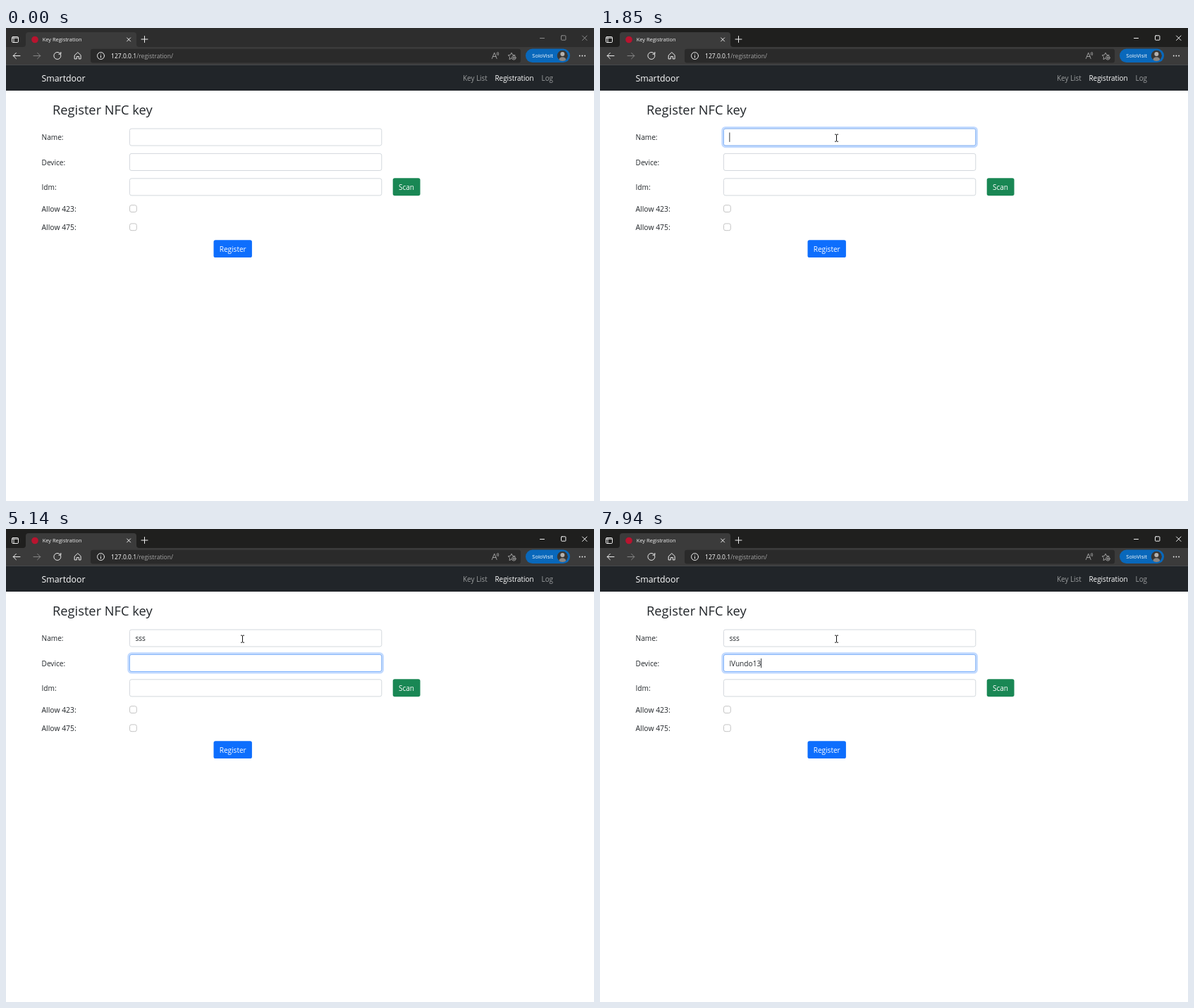
An HTML page that plays this animation: 834x672 px, repeating every 8 s.

```html
<!DOCTYPE html>
<html lang="en">
<head>
<meta charset="utf-8">
<title>Key Registration</title>
<style>
  html, body { margin: 0; width: 100%; height: 100%; overflow: hidden; background: #fff; }
  svg { display: block; width: 834px; height: 672px; font: 10.15px "Open Sans", "Noto Sans", sans-serif; }
  text { white-space: pre; fill: #212529; }
  .icon { fill: none; stroke: #eee; stroke-linecap: round; stroke-linejoin: round; }
  .dim { stroke: #858585; }
  .nav { font-size: 9.9px; fill: #9b9d9e; }
  .white { fill: #fff; }
  .field { fill: #fff; stroke: #ced4da; stroke-width: .9; }
  .check { fill: #fff; stroke: #bfbfbf; stroke-width: .9; }
  .edge { fill: none; stroke: #86b7fe; }
  .ring { fill: none; stroke: #0d6efd; stroke-opacity: .25; stroke-width: 2.67; }
</style>
</head>
<body>
<svg viewBox="0 0 834 672">
  <!-- tab strip -->
  <rect id="strip" width="834" height="28"/>
  <path d="M24 27q4 0 4-4V10q0-4 4-4H181q4 0 4 4V23q0 4 4 4z" fill="#3b3b3b"/>
  <rect y="27" width="834" height="25.5" fill="#3b3b3b"/>
  <g class="icon">
    <rect x="8.5" y="12.5" width="9" height="8" rx="1.3"/>
    <path d="M8.5 14.2H17.5M11 14V20"/>
    <path d="M171.6 13.9l5 5m0-5l-5 5M192 16h9m-4.5-4.5v9"/>
  </g>
  <g id="winButtons" class="icon">
    <path d="M757.5 14.5h6M817.5 11l6.5 6.5m0-6.5l-6.5 6.5"/>
    <rect x="787.5" y="10.8" width="6.4" height="6.4" rx=".8"/>
  </g>
  <circle cx="41" cy="16.5" r="4.8" fill="#b8142f"/>
  <text x="51.7" y="19" font-size="7.45" style="fill:#f2f2f2">Key Registration</text>

  <!-- toolbar -->
  <g class="icon">
    <path d="M20 39.5H10.2m4.2-4.2l-4.2 4.2l4.2 4.2"/>
    <path class="dim" d="M39 39.5h9.8m-4.2-4.2l4.2 4.2l-4.2 4.2"/>
    <path d="M77.8 38.5a5 5 0 1 1-1.6-2.8l1.4 1.3m.2-2.6v2.8h-2.9"/>
    <path d="M97.5 38.6l4.3-4l4.3 4v5.3h-2.8v-3.4h-3v3.4h-2.8z"/>
  </g>
  <rect x="120" y="29.8" width="610" height="19.6" rx="3" fill="#2a2a2a"/>
  <g class="icon">
    <circle cx="134.5" cy="39.5" r="5"/>
    <path d="M134.5 39.2v2.8M134.5 36.9v.1"/>
  </g>
  <text x="149" y="42.8" font-size="8.55" style="fill:#a4a4a4"><tspan class="white">127.0.0.1</tspan>/registration/</text>
  <g class="icon" style="stroke:#a9a9a9;stroke-width:.9">
    <path d="M689.3 43.5l3.4-8.5l3.4 8.5m-1.1-3h-4.6M696.3 35.2q1.1 1.1 0 2.9m1.5-3.9q1.8 2 .3 4.6"/>
    <path d="M717 43l-3 1.6l.6-3.5l-2.5-2.4l3.4-.5l1.5-3.1l1.6 3.1l3.4.5"/>
    <circle cx="720.3" cy="42.3" r="2.8"/>
    <path d="M718.9 42.3h2.8m-1.4-1.4v2.8"/>
  </g>
  <rect x="737" y="29.6" width="63" height="19.4" rx="9.7" fill="#0968bb"/>
  <text class="white" x="746.3" y="42" font-size="7.5">SoloVisit</text>
  <clipPath id="disc"><circle cx="789.3" cy="39.3" r="7.7"/></clipPath>
  <g clip-path="url(#disc)">
    <circle cx="789.3" cy="39.3" r="7.7" fill="#383634"/>
    <circle cx="789.3" cy="37" r="3" fill="#b5b1ae"/>
    <ellipse cx="789.3" cy="45.4" rx="5" ry="4.2" fill="#8b8784"/>
  </g>
  <g fill="#eee"><circle cx="813.7" cy="39.5" r=".9"/><circle cx="817.4" cy="39.5" r=".9"/><circle cx="821.1" cy="39.5" r=".9"/></g>

  <!-- page -->
  <rect y="52.3" width="834" height="36.7" fill="#212529"/>
  <text class="white" x="50.5" y="75.9" font-size="12.35">Smartdoor</text>
  <text class="nav" x="648" y="75.2">Key List</text>
  <text class="nav white" x="693.5" y="75.2">Registration</text>
  <text class="nav" x="759.5" y="75.2">Log</text>
  <text x="66" y="123.3" font-size="18.3">Register NFC key</text>
  <text x="50.5" y="159.4">Name:</text>
  <text x="50.5" y="194.7">Device:</text>
  <text x="50.5" y="230">Idm:</text>
  <text x="50.5" y="261" font-size="10.4">Allow 423:</text>
  <text x="50.5" y="287" font-size="10.4">Allow 475:</text>
  <g id="fields"></g>
  <rect class="check" x="175.5" y="251.7" width="9.8" height="9.8" rx="2.5"/>
  <rect class="check" x="175.5" y="277.9" width="9.8" height="9.8" rx="2.5"/>
  <rect x="548.7" y="213.3" width="38.8" height="25" rx="2.7" fill="#198754"/>
  <text class="white" x="568" y="230" text-anchor="middle" font-size="10">Scan</text>
  <rect x="294.5" y="301.2" width="54.4" height="24.9" rx="2.7" fill="#0d6efd"/>
  <text class="white" x="321.7" y="317.9" text-anchor="middle" font-size="10.05">Register</text>
  <rect id="caret" width=".9" height="13.4" fill="#212529"/>
  <path id="pointer" d="M333 151.2h1.8l.7.6l.7-.6H338M335.5 151.8v8.8M333 161.2h1.8l.7-.6l.7.6H338" fill="none" stroke="#111"/>
</svg>
<script>
const LOOP = 8000, BLINK = 530, FADE = 150;
const CLICK = 780, TAB = 4140, POINTER_IN = 450;
const $ = id => document.getElementById(id);

const inputs = [
  { y: 142.6, value: 'sss', keys: [2500, 2700, 2900], focus: CLICK, blur: TAB },
  { y: 178, value: 'lVundo13', keys: [5300, 5550, 5800, 6000, 6400, 6650, 7150, 7450], focus: TAB, blur: Infinity },
  { y: 213.4, value: '', keys: [], focus: Infinity, blur: Infinity }
];

const box = (cls, y, grow) =>
  `<rect class="${cls}" x="${175.4 - grow}" y="${y + .4 - grow}" width="${357.4 + 2 * grow}" height="${24.1 + 2 * grow}" rx="${2.6 + grow}"/>`;

$('fields').innerHTML = inputs.map(({ y }) =>
  `<g>${box('field', y, 0)}<g>${box('ring', y, 1.75)}${box('edge', y, 0)}</g><text x="183.4" y="${y + 16.8}"></text></g>`).join('');
inputs.forEach((input, i) => {
  const group = $('fields').children[i];
  input.glow = group.children[1];
  input.text = group.children[2];
});

function fade(t, start) {
  const p = Math.min(1, Math.max(0, (t - start) / FADE));
  return p * p * (3 - 2 * p);
}

function draw(t) {
  const active = t >= CLICK;
  $('strip').setAttribute('fill', active ? '#1f1f1e' : '#2d2d2d');
  $('winButtons').style.stroke = active ? '#f2f2f2' : '#8c8c8c';
  $('pointer').style.opacity = t >= POINTER_IN ? 1 : 0;
  let caretOn = false;
  for (const { y, value, keys, focus, blur, glow, text } of inputs) {
    const typed = keys.filter(k => k <= t);
    text.textContent = value.slice(0, typed.length);
    glow.style.opacity = fade(t, focus) * (1 - fade(t, blur));
    if (t < focus || t >= blur) continue;
    const since = t - Math.max(focus, ...typed);
    caretOn = Math.floor(since / BLINK) % 2 === 0;
    const width = typed.length ? text.getComputedTextLength() : 0;
    $('caret').setAttribute('x', 183.4 + width);
    $('caret').setAttribute('y', y + 5.9);
  }
  $('caret').style.opacity = caretOn ? 1 : 0;
}

const begin = performance.now();
function frame() {
  draw((performance.now() - begin) % LOOP);
  requestAnimationFrame(frame);
}
frame();
</script>
</body>
</html>
```
